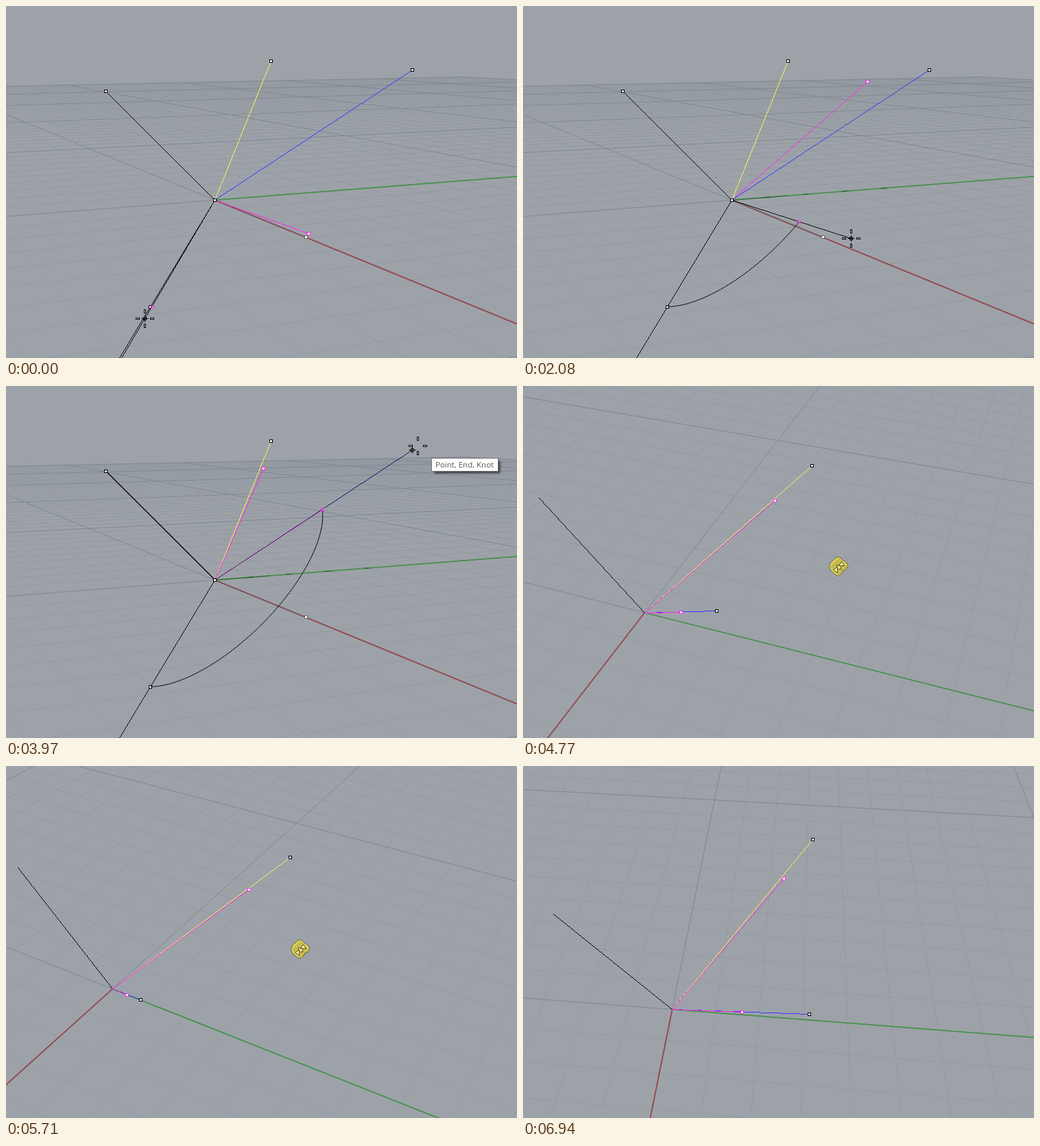
Animation of 745 by 514 pixels, one loop 7810 ms. Source, as an HTML page with a canvas:

```html
<!DOCTYPE html>
<html>
<head>
<meta charset="utf-8">
<style>
  html, body { margin: 0; width: 100%; height: 100%; overflow: hidden; background: #9da2a9; }
  canvas { display: block; }
</style>
</head>
<body>
<canvas id="stage" width="745" height="514"></canvas>
<script>
const ctx = document.getElementById('stage').getContext('2d');
const LOOP = 7810, SNAP = 3800, DONE = 4050, ORBIT = 4170, REST = 6940;
const FOCAL = 1235, DISTANCE = 21.5, CENTER = 257, RAD = Math.PI / 180;
const MAGENTA = '#ff28e6', BLACK = '#0a0a0a';

const ORIGIN = [0, 0, 0];
const PIVOT = [0, -2.52, 2.5];
const YELLOW = [-2.9, 2.945, 3];
const BLUE = [3.02, 2.93, 2.965];
const REF_ANGLE = -69.2, REF_RADIUS = 2.94, AXIS_RADIUS = 3.96;

// time, rotation angle, cursor radius in the rotation plane
const rotation = [
  [0, 1.2, 3.24], [50, 1.2, 3.24], [820, 31.5, 4.2], [1240, 47, 4.51], [1630, 60, 4.6],
  [2440, 80.5, 4.75], [2910, 94.8, 4.62], [3240, 103, 4.6], [SNAP, 123.3, 5.15]
];
// time, drag x and y, view offset x and y
const orbit = [
  [ORBIT, 611, 182.3, .5, 1.5], [5210, 399.7, 294, -1.8, -5],
  [6130, 463, 247, -2.2, 0], [REST, 512.7, 279.1, -2.8, .8]
];

// Monotone cubic interpolation of every column of a key list.
function sample(keys, time) {
  const last = keys.length - 1;
  const t = Math.min(Math.max(time, keys[0][0]), keys[last][0]);
  let i = 0;
  while (i < last - 1 && t > keys[i + 1][0]) i++;
  const slope = (k, c) => (keys[k + 1][c] - keys[k][c]) / (keys[k + 1][0] - keys[k][0]);
  const tangent = (k, c) => {
    if (k === 0) return slope(0, c);
    if (k === last) return slope(last - 1, c);
    const a = slope(k - 1, c), b = slope(k, c);
    return a * b <= 0 ? 0 : 2 * a * b / (a + b);
  };
  const span = keys[i + 1][0] - keys[i][0], s = (t - keys[i][0]) / span;
  return keys[i].slice(1).map((from, n) => {
    const c = n + 1, to = keys[i + 1][c];
    return from + (to - from) * s * s * (3 - 2 * s)
      + span * s * (1 - s) * (tangent(i, c) * (1 - s) - tangent(i + 1, c) * s);
  });
}

let view;
function setView(time) {
  const [x, y, dx, dy] = sample(orbit, time);
  const yaw = (39.8 - .2956 * (x - 400)) * RAD, pitch = (42.6 + .2956 * (y - 294)) * RAD;
  view = {
    x, y, centerX: CENTER + dx, centerY: CENTER + dy,
    cosYaw: Math.cos(yaw), sinYaw: Math.sin(yaw),
    cosPitch: Math.cos(pitch), sinPitch: Math.sin(pitch)
  };
}

// World point to [right, up, depth]; the orbit target lies near the world origin.
function toCamera([px, py, pz]) {
  const x = px + 2.58, y = py - .297, z = pz + .04;
  const ahead = -x * view.cosYaw - y * view.sinYaw;
  return [
    y * view.cosYaw - x * view.sinYaw,
    ahead * view.sinPitch + z * view.cosPitch,
    DISTANCE + ahead * view.cosPitch - z * view.sinPitch
  ];
}
const toScreen = ([r, u, d]) => [view.centerX + FOCAL * r / d, view.centerY - FOCAL * u / d];
const project = p => toScreen(toCamera(p));

function addLine(p, q) {
  const near = .5;
  let a = toCamera(p), b = toCamera(q);
  if (a[2] < near && b[2] < near) return;
  const clip = (from, to) => {
    const k = (near - from[2]) / (to[2] - from[2]);
    return from.map((v, i) => v + (to[i] - v) * k);
  };
  if (a[2] < near) a = clip(a, b);
  else if (b[2] < near) b = clip(b, a);
  ctx.moveTo(...toScreen(a));
  ctx.lineTo(...toScreen(b));
}
function strokeLines(color, width, lines) {
  ctx.beginPath();
  lines.forEach(([p, q]) => addLine(p, q));
  ctx.strokeStyle = color;
  ctx.lineWidth = width;
  ctx.stroke();
}
const line = (p, q, color, width = 1) => strokeLines(color, width, [[p, q]]);

// Hard-edged line without antialiasing.
function pixelLine(p, q, color, size = 1) {
  const [x0, y0] = project(p).map(Math.round), [x1, y1] = project(q).map(Math.round);
  const steps = Math.max(Math.abs(x1 - x0), Math.abs(y1 - y0), 1);
  ctx.fillStyle = color;
  for (let i = 0; i <= steps; i++) {
    const x = Math.round(x0 + (x1 - x0) * i / steps), y = Math.round(y0 + (y1 - y0) * i / steps);
    ctx.fillRect(x - .5, y - .5, size, 1);
  }
}

function box(x, y, w, h, stroke, fill) {
  ctx.fillStyle = fill;
  ctx.strokeStyle = stroke;
  ctx.lineWidth = 1;
  ctx.fillRect(x, y, w, h);
  ctx.strokeRect(x, y, w, h);
}
function marker(p, stroke = '#000', fill = '#fff') {
  const [x, y] = project(p).map(Math.round);
  box(x - 2, y - 2, 4, 4, stroke, fill);
}

// Point of the rotation plane, which is perpendicular to the pivot line.
function inPlane(degrees, radius) {
  const rise = radius * Math.sin(degrees * RAD) / Math.SQRT2;
  return [radius * Math.cos(degrees * RAD), rise, rise];
}

function drawGrid() {
  const minor = [], major = [];
  for (let i = -50; i <= 50; i++) {
    (i % 10 ? minor : major).push([[i, -50, 0], [i, 50, 0]], [[-50, i, 0], [50, i, 0]]);
  }
  strokeLines('#949aa1', 1, minor);
  strokeLines('#80878e', 1, major);
  line(ORIGIN, [50, 0, 0], '#94474b', 1.8);
  line(ORIGIN, [0, 50, 0], '#46934a', 1.8);
}

function drawCrosshair(x, y) {
  for (const d of [-13, 8]) {
    box(x + d, y - 1, 5, 2, '#000', '#c8ccd0');
    box(x - 1, y + d, 2, 5, '#000', '#c8ccd0');
  }
}
function drawPick(x, y) {
  ctx.strokeStyle = '#000';
  ctx.lineWidth = 1;
  ctx.strokeRect(x - 2, y - 2, 4, 4);
  ctx.beginPath();
  ctx.moveTo(x - 5, y); ctx.lineTo(x + 5, y);
  ctx.moveTo(x, y - 5); ctx.lineTo(x, y + 5);
  ctx.stroke();
}

function drawTooltip() {
  ctx.save();
  ctx.shadowColor = 'rgba(0,0,0,.6)';
  ctx.shadowBlur = 3;
  ctx.shadowOffsetX = ctx.shadowOffsetY = 3;
  ctx.fillStyle = '#fff';
  ctx.fillRect(620, 105, 97, 19);
  ctx.restore();
  box(620, 105, 97, 19, '#767676', '#fff');
  ctx.fillStyle = '#575757';
  ctx.font = '11.5px "Open Sans", sans-serif';
  ctx.fillText('Point, End, Knot', 625.5, 118.5);
}

function drawOrbitCursor(x, y) {
  ctx.save();
  ctx.translate(Math.round(x), Math.round(y));
  ctx.lineWidth = 1;
  ctx.strokeStyle = '#3a3614';
  ctx.fillStyle = '#ddd35e';
  ctx.beginPath();
  ctx.moveTo(0, -14);
  ctx.quadraticCurveTo(5, -12, 6, -9);
  ctx.quadraticCurveTo(14, -6, 14, 0);
  ctx.quadraticCurveTo(12, 5, 7, 6);
  ctx.quadraticCurveTo(5, 12, 0, 14);
  ctx.quadraticCurveTo(-5, 12, -7, 9);
  ctx.quadraticCurveTo(-13, 5, -13, 0);
  ctx.quadraticCurveTo(-12, -6, -7, -9);
  ctx.quadraticCurveTo(-5, -12, 0, -14);
  ctx.fill();
  ctx.setLineDash([2, 1]);
  ctx.stroke();
  ctx.setLineDash([]);
  ctx.fillStyle = '#7d752e';
  for (let j = -11; j <= 11; j += 2)
    for (let i = Math.abs(j) - 12; i <= 12 - Math.abs(j); i += 2) ctx.fillRect(i, j, 1, 1);
  box(-2, -2, 6, 6, '#5c5520', '#e6dc78');
  ctx.fillStyle = '#f6efa0';
  const arrow = (dx, dy, turn) => {
    ctx.save();
    ctx.translate(dx, dy);
    ctx.rotate(turn);
    ctx.beginPath();
    ctx.moveTo(-4, 3); ctx.lineTo(0, -3); ctx.lineTo(4, 3); ctx.closePath();
    ctx.fill();
    ctx.stroke();
    ctx.restore();
  };
  arrow(5, -4, 0);
  arrow(-4, 5, -Math.PI / 2);
  ctx.restore();
}

function drawRotation(time, angle, radius, turnedRef) {
  const snapped = time >= SNAP;
  const reference = inPlane(REF_ANGLE, REF_RADIUS);
  const pick = snapped ? BLUE : inPlane(REF_ANGLE + angle, radius);
  const reach = time < 50 ? inPlane(REF_ANGLE + angle, 6) : pick;

  pixelLine(ORIGIN, inPlane(REF_ANGLE, 6), BLACK);
  if (time >= 50) {
    ctx.setLineDash([9, 48]);
    line([0, .8, 0], [0, 5, 0], 'rgba(0,0,0,.45)');
    ctx.setLineDash([]);
    line(ORIGIN, [0, 1.4, 0], 'rgba(0,0,0,.3)');
  }
  marker(reference);
  pixelLine(ORIGIN, reach, snapped ? 'rgba(0,0,0,.6)' : BLACK);

  ctx.beginPath();
  for (let i = 0; i <= 60; i++)
    ctx.lineTo(...project(inPlane(REF_ANGLE + angle * i / 60, REF_RADIUS)));
  ctx.strokeStyle = BLACK;
  ctx.lineWidth = 1;
  ctx.stroke();

  marker(PIVOT);
  marker(ORIGIN);
  marker(turnedRef, MAGENTA, 'rgba(255,255,255,.3)');

  const [x, y] = project(pick).map(Math.round);
  drawPick(x, y);
  drawCrosshair(x + (snapped ? 8 : 0), y - (snapped ? 6 : 0));
  if (snapped) drawTooltip();
}

function draw(time) {
  const rotating = time < DONE;
  const [angle, radius] = sample(rotation, time);
  const turnedRef = inPlane(REF_ANGLE + angle, REF_RADIUS);
  const turnedAxis = inPlane(angle, AXIS_RADIUS);
  setView(time);

  ctx.setTransform(1, 0, 0, 1, 0, 0);
  ctx.fillStyle = '#9da2a9';
  ctx.fillRect(0, 0, 745, 514);
  ctx.translate(.5, .5);
  drawGrid();

  if (rotating) {
    line(ORIGIN, [AXIS_RADIUS, 0, 0], 'rgba(95,95,100,.6)', 1.4);
    marker([AXIS_RADIUS, 0, 0], '#666');
  }
  pixelLine(ORIGIN, PIVOT, BLACK, rotating && time >= SNAP ? 2 : 1);
  pixelLine(ORIGIN, YELLOW, '#f6f452');
  pixelLine(ORIGIN, BLUE, '#3838ff');
  pixelLine(ORIGIN, turnedAxis, MAGENTA);
  if (time >= SNAP) pixelLine(ORIGIN, turnedRef, MAGENTA);
  marker(YELLOW);
  marker(BLUE);
  marker(turnedAxis, MAGENTA);

  if (rotating) drawRotation(time, angle, radius, turnedRef);
  else marker(turnedRef, MAGENTA);
  if (time >= ORBIT && time < REST) drawOrbitCursor(view.x, view.y);
}

const start = performance.now();
function tick() {
  draw((performance.now() - start) % LOOP);
  requestAnimationFrame(tick);
}
tick();
</script>
</body>
</html>
```
